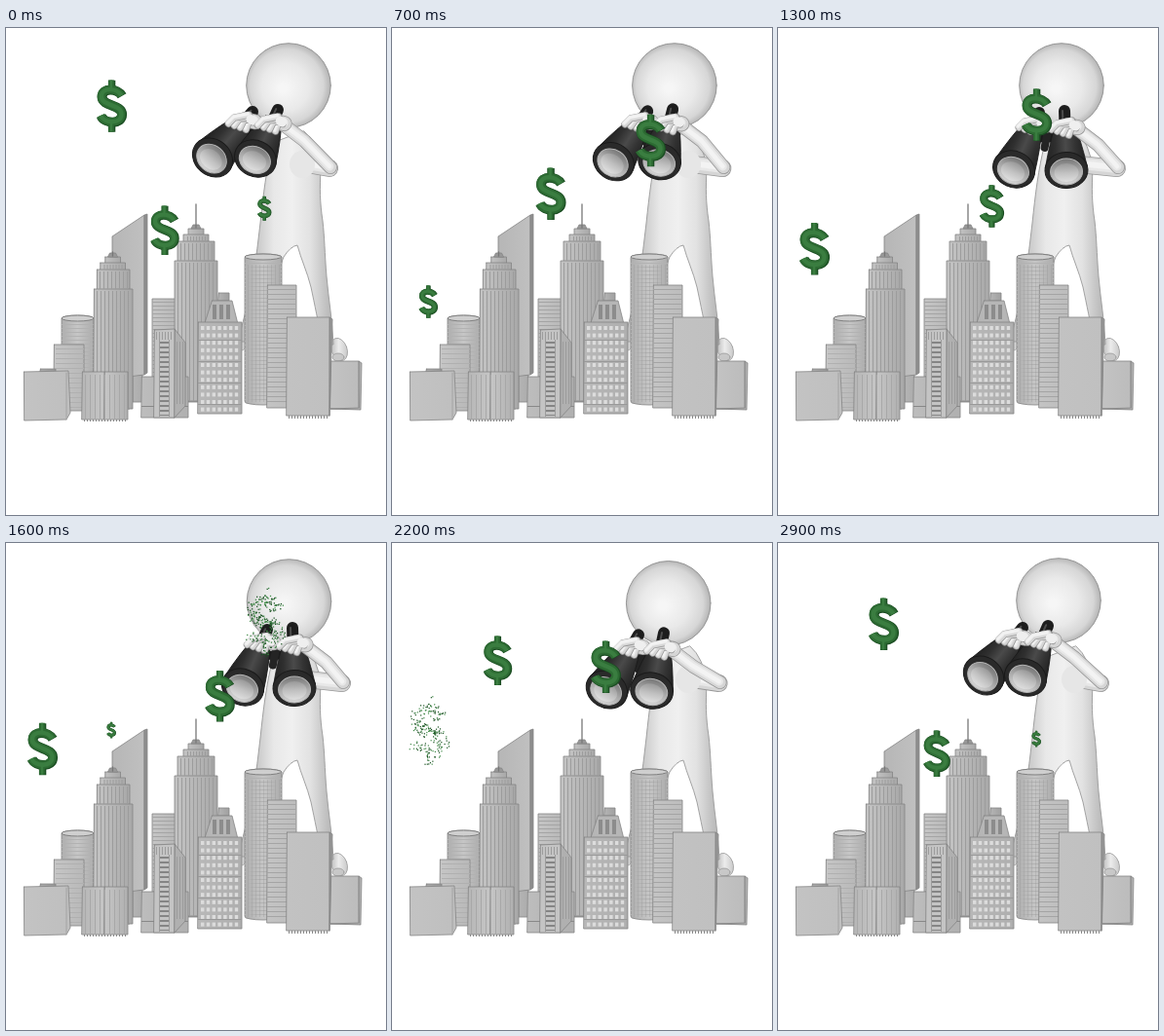
Recreate the animation shown at these times as an HTML page with a canvas. Size 390 by 500 pixels, loop 3 s.

```html
<!DOCTYPE html>
<html lang="en">
<head>
<meta charset="utf-8">
<title>Looking for profit</title>
<style>
html, body { margin: 0; width: 100%; height: 100%; overflow: hidden; background: #fff; }
canvas { display: block; }
</style>
</head>
<body>
<canvas id="stage" width="390" height="500"></canvas>
<script>
const W = 390, H = 500, LOOP = 3000, STEP = 100;
const stage = document.getElementById('stage').getContext('2d');
let ctx = stage;

function layer() {
  const c = document.createElement('canvas');
  c.width = W; c.height = H;
  return c.getContext('2d', { willReadFrequently: true });
}

function randomizer(seed) {
  return () => (seed = (seed * 16807) % 2147483647) / 2147483647;
}

const mix = (a, b, k) => a + (b - a) * k;
const between = (p, q, k) => [mix(p[0], q[0], k), mix(p[1], q[1], k)];
const clamp = v => Math.max(0, Math.min(1, v));

function gradient(x0, y0, x1, y1, ...colors) {
  const g = ctx.createLinearGradient(x0, y0, x1, y1);
  colors.forEach((c, i) => g.addColorStop(i / (colors.length - 1), c));
  return g;
}

function paint(path, fill, stroke = '#858585', width = 0.8) {
  ctx.fillStyle = fill;
  ctx.fill(path);
  if (!stroke) return;
  ctx.strokeStyle = stroke;
  ctx.lineWidth = width;
  ctx.stroke(path);
}

function poly(points, fill, stroke) {
  const path = new Path2D();
  points.forEach(p => path.lineTo(...p));
  path.closePath();
  paint(path, fill, stroke);
}

function oval(x, y, rx, ry, turn, fill, stroke, width) {
  const path = new Path2D();
  path.ellipse(x, y, rx, ry, turn, 0, Math.PI * 2);
  paint(path, fill, stroke, width);
}

function line(points, color, width) {
  ctx.strokeStyle = color;
  ctx.lineWidth = width;
  ctx.lineCap = ctx.lineJoin = 'round';
  ctx.beginPath();
  points.forEach(p => ctx.lineTo(...p));
  ctx.stroke();
}

// ---------- city ----------

function block(x0, y0, x1, y1, light = '#c6c6c6', dark = '#b8b8b8') {
  poly([[x0, y0], [x1, y0], [x1, y1], [x0, y1]], gradient(x0, 0, x1, 0, light, dark));
}

function columns(x0, x1, y0, y1, gap, color = '#9c9c9c', width = 1) {
  ctx.fillStyle = color;
  for (let x = x0; x < x1; x += gap) ctx.fillRect(x, y0, width, y1 - y0);
}

function floors(x0, x1, y0, y1, gap, color = '#a4a4a4') {
  ctx.fillStyle = color;
  for (let y = y0; y < y1; y += gap) ctx.fillRect(x0, y, x1 - x0, 1);
}

function cylinder(x0, x1, top, bottom) {
  const mid = (x0 + x1) / 2, r = (x1 - x0) / 2;
  const path = new Path2D();
  path.ellipse(mid, top, r, 3, 0, Math.PI, 0);
  path.lineTo(x1, bottom);
  path.ellipse(mid, bottom, r, 3, 0, 0, Math.PI);
  path.closePath();
  paint(path, gradient(x0, 0, x1, 0, '#aeaeae', '#c6c6c6', '#acacac'));
  floors(x0, x1, top + 6, bottom, 4, '#b2b2b2');
  oval(mid, top, r, 3, 0, '#cfcfcf', '#808080', 1);
}

// Stepped skyscraper with an antenna.
function skyscraper(x, left, right, top, bottom, tip) {
  block(x - 8, top - 33, x + 8, top, '#c2c2c2', '#a8a8a8');
  block(x - 13, top - 27, x + 13, top, '#c4c4c4', '#a8a8a8');
  block(left + 3, top - 20, right - 3, bottom, '#c4c4c4', '#a8a8a8');
  block(left, top, right, bottom, '#c4c4c4', '#a8a8a8');
  columns(left + 3, right - 2, top + 2, bottom, 4);
  columns(left + 6, right - 4, top - 18, top, 4);
  columns(x - 9, x + 10, top - 25, top - 20, 3);
  poly([[x - 5, top - 33], [x - 3, top - 37], [x + 3, top - 37], [x + 5, top - 33]], '#999');
  line([[x, tip], [x, top - 34]], '#777', 1.3);
}

function windowTower() {
  block(218, 272, 229, 280, '#b4b4b4', '#a0a0a0');
  poly([[211, 280], [232, 280], [238, 304], [204, 304]], '#b6b6b6');
  columns(212, 233, 284, 299, 7, '#8c8c8c', 4);
  block(197, 302, 242, 396, '#b8b8b8', '#aeaeae');
  for (let y = 306; y < 392; y += 7.6) {
    columns(200, 240, y, y + 4, 5.8, '#dcdcdc', 3.4);
  }
  floors(197, 242, 320, 390, 22, '#999');
}

function drawCity() {
  block(130, 356, 140, 384, '#b4b4b4', '#acacac');
  block(186, 364, 198, 384, '#b8b8b8', '#b0b0b0');
  poly([[109, 214], [142, 192], [142, 356], [109, 360]], gradient(109, 0, 142, 0, '#b6b6b6', '#c0c0c0'));
  poly([[142, 192], [145, 191], [145, 354], [142, 356]], '#8f8f8f');
  cylinder(57, 90, 298, 352);
  block(150, 278, 174, 360);
  floors(150, 174, 281, 358, 4);
  skyscraper(195, 173, 217, 239, 383, 181);
  skyscraper(109.5, 90, 130, 268, 391, 230);
  block(49, 325, 80, 393);
  floors(51, 80, 329, 392, 5, '#b0b0b0');
  cylinder(245, 283, 235, 384);
  columns(248, 281, 243, 384, 4, 'rgba(140,140,140,.25)');
  block(268, 264, 298, 390, '#c4c4c4', '#bcbcbc');
  floors(268, 298, 268, 388, 5);
  block(333, 342, 362, 391, '#c3c3c3', '#bcbcbc');
  poly([[362, 342], [365, 344], [364, 392], [333, 391], [362, 390]], '#b2b2b2');
  block(288, 297, 332, 398, '#c2c2c2', '#c0c0c0');
  poly([[332, 297], [335, 299], [332, 398]], '#999');
  columns(290, 331, 398, 401, 3, '#888');
  windowTower();

  block(139, 358, 187, 400, '#bdbdbd', '#b0b0b0');
  floors(139, 187, 388, 391, 4, '#888');
  poly([[152, 310], [173, 309], [173, 400], [152, 400]], '#c4c4c4');
  poly([[173, 309], [184, 323], [184, 388], [173, 400]], '#b0b0b0');
  columns(175, 184, 322, 386, 3);
  floors(158, 167, 322, 398, 5, '#858585');
  floors(158, 167, 323, 398, 5, '#858585');
  columns(157, 168, 320, 399, 10);
  columns(154, 172, 312, 320, 3);

  block(78, 353, 101, 402, '#b6b6b6', '#c6c6c6');
  block(101, 353, 125, 402, '#c6c6c6', '#b0b0b0');
  columns(81, 124, 356, 401, 5, '#a8a8a8');
  columns(80, 125, 402, 404, 3, '#888');
  block(35, 350, 51, 354, '#aaa', '#999');
  poly([[18, 353], [64, 352], [66, 395], [62, 402], [19, 403]], gradient(18, 0, 65, 0, '#c3c3c3', '#bfbfbf'));
  line([[62, 354], [62, 402]], '#a8a8a8', 1.2);
}

// ---------- figure ----------

// time, head x y, left lens x y, right lens x y, left eyepiece x y, elbow edge
const POSES = [
  [0, 290, 59, 212, 133, 256, 134, 253, 86, 341],
  [400, 289.5, 59, 220, 135, 265, 135, 259, 85, 346],
  [1000, 290.5, 59, 235, 140, 285, 140, 265, 86, 351],
  [1300, 291, 59, 242, 145, 296, 146, 268, 87, 357],
  [1600, 290.5, 60, 243, 148, 296, 149, 268, 89, 354],
  [1900, 287, 62, 231, 151, 279, 152, 261, 92, 349],
  [2500, 282, 61, 212, 148, 257, 149, 247, 95, 341],
  [2900, 288, 59, 211, 136, 254, 138, 251, 87, 340]
];

function poseAt(t) {
  const n = POSES.length;
  const key = i => {
    const turn = Math.floor(i / n);
    const [time, ...values] = POSES[i - turn * n];
    return { time: time + turn * LOOP, values };
  };
  let i = n - 1;
  while (POSES[i][0] > t) i--;
  const [a, b, c, d] = [i - 1, i, i + 1, i + 2].map(key);
  const span = c.time - b.time, u = (t - b.time) / span;
  return b.values.map((from, k) => {
    const to = c.values[k];
    const m0 = (to - a.values[k]) / (c.time - a.time) * span;
    const m1 = (d.values[k] - from) / (d.time - b.time) * span;
    return from + u * (m0 + u * (3 * (to - from) - 2 * m0 - m1 + u * (2 * (from - to) + m0 + m1)));
  });
}

function limb(points, width) {
  line(points, '#989898', width + 1);
  line(points, '#d6d6d6', width - 0.6);
  line(points.map(([x, y]) => [x - 1, y - 1]), '#e8e8e8', width * 0.68);
  line(points.map(([x, y]) => [x - 1, y - 1]), '#f3f3f3', width * 0.35);
}

const BODY = new Path2D('M274 118 C267 145 264 172 261 200 C258 225 256 245 250 275 L238 322 L270 322 ' +
  'C275 285 277 255 285 235 Q292 224 299 223 C303 238 309 250 313 266 C317 285 320 300 325 325 ' +
  'L336 325 C335 300 331 278 329 255 C327 230 327 215 325 198 C322 178 322 165 323 145 Q320 118 306 106 Z');

function drawBody() {
  oval(242, 322, 5, 9, 0, '#d6d6d6', '#aaa');
  oval(342, 330, 8, 12, -0.35, gradient(332, 0, 351, 0, '#b4b4b4', '#ececec', '#c8c8c8'), '#999');
  oval(341, 338, 6, 4, 0, '#c8c8c8', '#999');
  paint(BODY, gradient(256, 0, 331, 0, '#c6c6c6', '#e8e8e8', '#f0f0f0', '#e2e2e2', '#bcbcbc'), '#999', 0.9);
}

function drawHead(x, y) {
  const g = ctx.createRadialGradient(x - 6, y + 3, 4, x - 1, y, 45);
  g.addColorStop(0, '#f6f6f6');
  g.addColorStop(0.5, '#e9e9e9');
  g.addColorStop(0.82, '#d6d6d6');
  g.addColorStop(1, '#b0b0b0');
  oval(x, y, 43.3, 43.3, 0, g, '#8e8e8e', 0.9);
}

function drawBarrel(eye, lens) {
  const dx = lens[0] - eye[0], dy = lens[1] - eye[1];
  const length = Math.hypot(dx, dy), turn = Math.atan2(dy, dx);
  ctx.save();
  ctx.translate(...eye);
  ctx.rotate(turn);
  line([[0, 0], [length * 0.3, 0]], '#1d1d1d', 12);
  line([[0, 2], [length * 0.25, 2]], '#4c4c4c', 2);
  const tube = new Path2D();
  tube.moveTo(length * 0.2, -9);
  tube.quadraticCurveTo(length * 0.5, -16, length * 0.95, -21.5);
  tube.lineTo(length * 0.95, 21.5);
  tube.quadraticCurveTo(length * 0.5, 16, length * 0.2, 9);
  tube.closePath();
  paint(tube, gradient(0, -20, 0, 20, '#222', '#333', '#4a4a4a', '#303030', '#222'), '#1a1a1a');
  oval(length, 0, 18.5, 22, 0, '#2a2a2a', '#1a1a1a', 1);
  oval(length + 1.5, 0, 13.5, 16.5, 0, gradient(length - 12, 0, length + 15, 0, '#777', '#aaa', '#d6d6d6'), '#b4b4b4', 1);
  oval(length + 2.5, 0, 9.5, 12.5, 0, gradient(length - 7, 0, length + 12, 0, '#999', '#c0c0c0', '#dedede'), null);
  ctx.restore();
}

function drawHand([x, y]) {
  limb([[x + 3, y - 2], [x + 13, y]], 15);
  for (let i = 3; i >= 0; i--) {
    limb([[x + 7 + i * 1.5, y - 7 + i * 2.5], [x - 8 + i * 5, y - 4 + i], [x - 14 + i * 6, y + 2 + i * 2]], 6.4);
  }
  oval(x + 10, y - 2, 6, 5, 0.4, '#efefef', null);
}

function drawFigure(t) {
  const [hx, hy, lx, ly, rx, ry, ex, ey, edge] = poseAt(t);
  const lensL = [lx, ly], lensR = [rx, ry];
  const eyeL = [ex, ey], eyeR = [ex + 26, ey - 2];
  const handL = between(eyeL, lensL, 0.26), handR = between(eyeR, lensR, 0.28);
  const elbow = [edge - 9, 144];
  const hinge = k => between(between(eyeL, lensL, k), between(eyeR, lensR, k), 0.5);
  handL[1] -= 2;

  drawBody();
  drawHead(hx, hy);
  limb([[309, 140], elbow], 17);
  oval(304, 140, 13, 14, 0, '#e6e6e6', null);
  line([between(eyeL, lensL, 0.45), between(eyeR, lensR, 0.45)], '#1c1c1c', 9);
  line([hinge(0.35), hinge(0.62)], '#242424', 8);
  drawBarrel(eyeL, lensL);
  drawBarrel(eyeR, lensR);
  drawHand(handL);
  limb([[elbow[0] + 1, 143], [handR[0] + 34, handR[1] + 18], [handR[0] + 13, handR[1] + 2]], 13);
  drawHand(handR);
}

// ---------- dollars ----------

const CURVE = new Path2D('M10.5 -10.5 C6 -18.5 -10 -19.5 -10 -9.5 C-10 0.5 10.5 -2 10.5 8.5 C10.5 19 -7 18.5 -11 10');
const BAR = new Path2D('M0 -26.5 V-16 M0 16 V26.5');
const DOLLARS = [
  { x: 37, y: 313.5, start: 380 },
  { x: 219, y: 236, start: 800 },
  { x: 108, y: 192, start: 1500 },
  { x: 162.5, y: 279, start: 2300 },
  { x: 265, y: 201, start: 2800 }
];
const FADE_START = 1550, FADE_TIME = 370;

function strokeDollar(color, curveWidth, barWidth) {
  ctx.lineCap = 'butt';
  ctx.strokeStyle = color;
  ctx.lineWidth = curveWidth;
  ctx.stroke(CURVE);
  ctx.lineWidth = barWidth;
  ctx.stroke(BAR);
}

function solidDollar() {
  ctx.save();
  ctx.translate(0.6, 0.4);
  strokeDollar('#1b4d22', 10, 7.4);
  ctx.restore();
  strokeDollar('#2d6b33', 8.6, 5.8);
  strokeDollar('#3a7d40', 4.4, 2.4);
}

// Random points inside the sign, used when it breaks up.
function scatter() {
  const random = randomizer(77);
  ctx = layer();
  ctx.translate(30, 30);
  strokeDollar('#000', 9.4, 6.6);
  const { data } = ctx.getImageData(0, 0, 60, 60);
  const dots = [];
  while (dots.length < 750) {
    const x = random() * 60, y = random() * 60;
    if (data[(Math.floor(y) * 60 + Math.floor(x)) * 4 + 3] < 128) continue;
    dots.push({
      x: x - 30, y: y - 30, life: random(),
      dx: random() * 2 - 1, dy: random() * 2 - 1,
      color: random() < 0.55 ? '#17511f' : '#3f8a47'
    });
  }
  return dots;
}

function brokenDollar(dots, p) {
  const spread = 1 + 0.4 * p, size = mix(2, 0.9, p);
  for (const d of dots) {
    if (d.life < p * 0.95) continue;
    ctx.fillStyle = d.color;
    ctx.fillRect(d.x * spread + d.dx * 4 * p, d.y * spread + d.dy * 5 * p, size, size);
  }
}

function drawDollar({ x, y, start }, t, dots) {
  const age = (t - start + LOOP) % LOOP;
  const fade = clamp((age - FADE_START) / FADE_TIME);
  if (fade === 1) return;
  const grow = clamp((age + 70) / 1000);
  const scale = 1 - (1 - grow) ** 2;
  const rise = 136 * (1 - Math.exp(-(age - 100) / 805));
  ctx.save();
  ctx.translate(x, y - rise);
  ctx.scale(scale, scale);
  if (fade > 0.1) brokenDollar(dots, fade);
  else solidDollar();
  ctx.restore();
}

// ---------- run ----------

const dots = scatter();
const city = ctx = layer();
drawCity();
ctx = stage;

function frame() {
  const t = Math.floor(performance.now() / STEP) * STEP % LOOP;
  ctx.fillStyle = '#fff';
  ctx.fillRect(0, 0, W, H);
  drawFigure(t);
  ctx.drawImage(city.canvas, 0, 0);
  DOLLARS.forEach(d => drawDollar(d, t, dots));
  requestAnimationFrame(frame);
}
frame();
</script>
</body>
</html>
```
